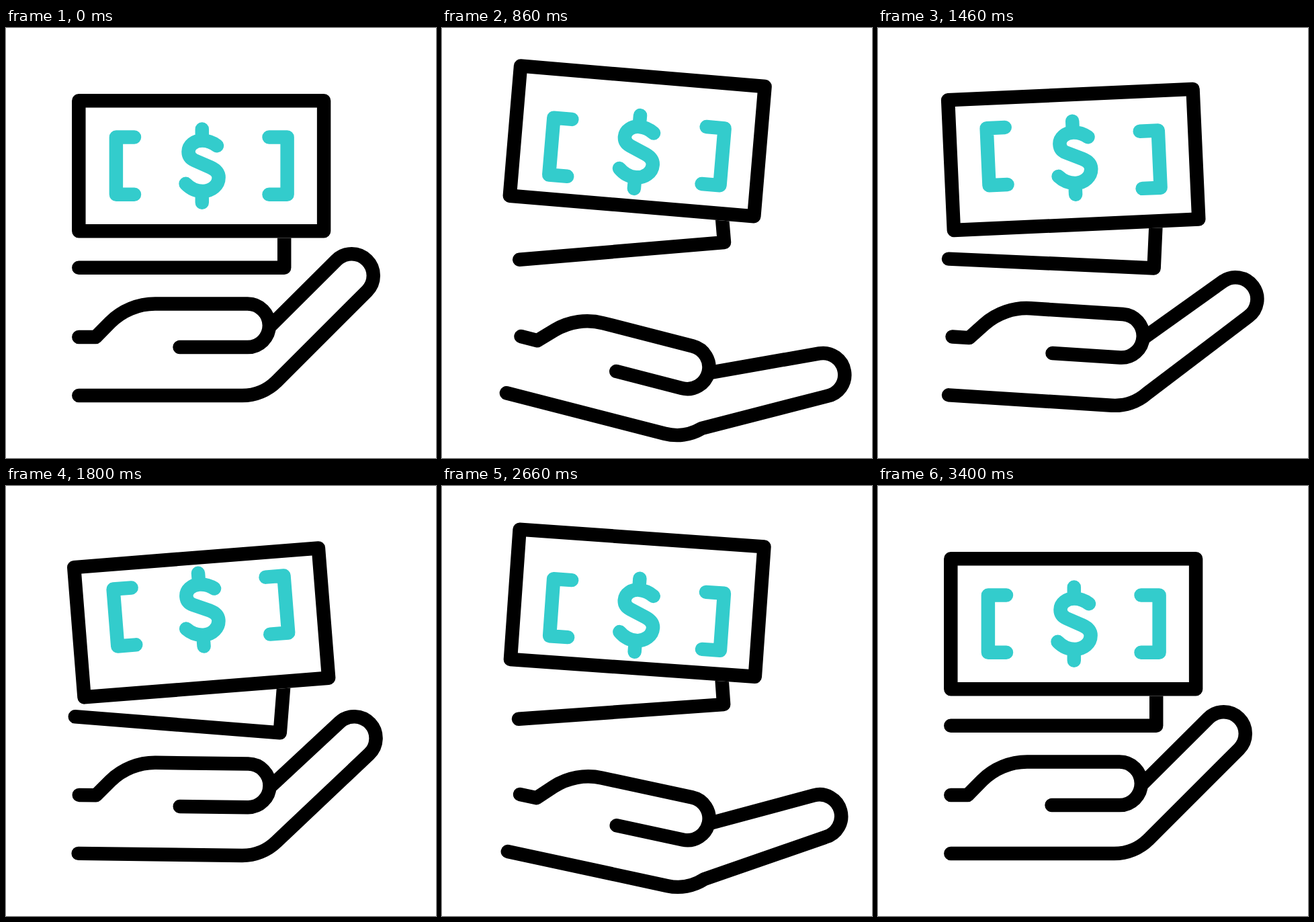
These frames come from a looping animation (640 by 640 pixels, 3620 ms). An HTML page:

```html
<!DOCTYPE html>
<html lang="en">
<head>
<meta charset="utf-8">
<title>Money in hand</title>
<style>
  html, body { margin: 0; width: 100%; height: 100%; overflow: hidden; background: #fff; }
  svg { display: block; width: 100%; height: 100%; }
  path, rect { fill: none; stroke: #000; stroke-width: 20.48; stroke-linecap: round; stroke-linejoin: round; }
  #bill .paper { fill: #fff; stroke: #fff; }
  #bill path { stroke: #33cccc; }
</style>
</head>
<body>
<svg viewBox="0 0 640 640">
  <path id="under" d="M108.3 356.8H414.2V240"/>
  <g id="bill">
    <rect class="paper" x="108.3" y="108.3" width="364.8" height="193.9"/>
    <rect x="108.3" y="108.3" width="364.8" height="193.9"/>
    <path id="left" d="M191 162.6H163.9V247.8H191"/>
    <path id="dollar" d="M291.8 150.6V166M291.8 245V259.8
      M314 175.2C307 170 300 167.5 292 167.5C280.5 167.5 271.5 174.5 271.5 184
      C271.5 190.5 275 194.5 280.5 197L304.5 207.5C311 210.5 316.6 215.5 316.6 222.5
      C316.6 234 306 243 293 243C282 243 274 238.5 267.5 231.8"/>
    <path id="right" d="M391.5 162.6H418.6V247.8H391.5"/>
  </g>
  <g id="hand">
    <path d="M108.3 460H133.5L154.8 438.3A95 95 0 0 1 222 410.5H359.5A32.3 32.3 0 0 1 359.5 475.1H258.5"/>
    <path id="finger"/>
  </g>
</svg>
<script>
  const LOOP = 3620, HOLD = 200, STEP = 20, BEAT = 750;
  const LIFT = [0, 1, 0, 1, 0];
  const SWAY = [0, 1, -1, 1, 0];
  const el = id => document.getElementById(id);
  const parts = { left: 0, dollar: 100, right: 200 };   // delay of each print, ms

  // Eased value of a list of keys placed one beat apart
  function keyed(keys, time) {
    const pos = Math.min(Math.max(time / BEAT, 0), keys.length - 1);
    const i = Math.min(Math.floor(pos), keys.length - 2);
    const s = pos - i;
    return keys[i] + (keys[i + 1] - keys[i]) * s * s * (3 - 2 * s);
  }

  function place(id, dy, angle = 0, cx = 0, cy = 0) {
    el(id).setAttribute("transform", `translate(0 ${dy}) rotate(${angle} ${cx} ${cy})`);
  }

  // The fingertip moves and turns while its base stays fixed to the palm
  function fingerPath(bend) {
    const r = 32.3, a = (45 - 22 * bend) * Math.PI / 180;
    const x = 514.5 + 45.2 * bend, y = 368.6 + 36.5 * bend;
    const dx = r * Math.sin(a), dy = r * Math.cos(a);
    return `M395 442L${x - dx} ${y - dy}A${r} ${r} 0 0 1 ${x + dx} ${y + dy}` +
      "L403 525.7A72.8 72.8 0 0 1 351.5 547H108.3";
  }

  function draw(ms) {
    const time = Math.floor((ms % LOOP) / STEP) * STEP - HOLD;
    const lift = keyed(LIFT, time), sway = keyed(SWAY, time);
    place("bill", -38.4 * lift, 5 * sway, 290.7, 205.2);
    place("under", -25.6 * lift, -5 * sway, 261.2, 281);
    place("hand", 0, 15 * lift, 117, 496);
    for (const id in parts) place(id, 19.2 * keyed(SWAY, time - parts[id]));
    el("finger").setAttribute("d", fingerPath(lift));
  }

  const start = performance.now();
  function tick() {
    draw(performance.now() - start);
    requestAnimationFrame(tick);
  }
  tick();
</script>
</body>
</html>
```
